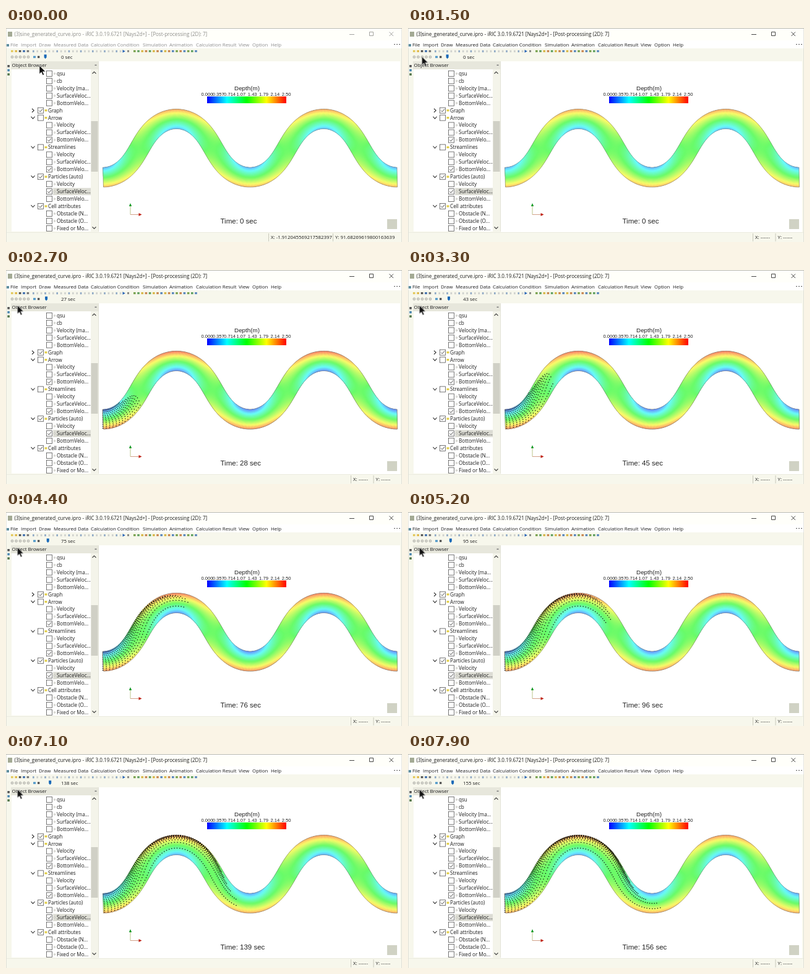
An HTML page with a canvas for the animation above (8 s loop, 640x347 px).

```html
<!DOCTYPE html>
<html lang="en">
<head>
<meta charset="utf-8">
<title>River flow post-processing</title>
<style>
  html, body { margin: 0; width: 640px; height: 347px; overflow: hidden; background: #fff; }
  #stage { position: relative; width: 640px; height: 347px; overflow: hidden; }
  svg, canvas { position: absolute; left: 0; top: 0; }
  text { font: 7.9px "Open Sans", "Noto Sans", sans-serif; fill: #1c1c1c; white-space: pre; }
  text.plot { font-family: "Liberation Sans", Arial, sans-serif; fill: #222; }
  #heading { animation: wake 8s step-end infinite; }
  #coords { animation: hide 8s step-end infinite; }
  #blank { animation: show 8s step-end infinite; }
  #cursor { animation: point 8s linear infinite; }
  #strong { animation: deepen 8s linear infinite; }
  @keyframes wake { 0% { opacity: .5 } 18.75% { opacity: 1 } }
  @keyframes hide { 0% { opacity: 1 } 18.75% { opacity: 0 } }
  @keyframes show { 0% { opacity: 0 } 18.75% { opacity: 1 } }
  @keyframes deepen {
    0%, 21% { opacity: 0 }
    27%, 42% { opacity: 1 }
    65% { opacity: .75 }
    78%, 100% { opacity: .3 }
  }
  @keyframes point {
    0%, 3% { transform: translate(54px, 61px); animation-timing-function: ease-in-out }
    16%, 30% { transform: translate(22.5px, 46.5px); animation-timing-function: ease-in-out }
    33.5%, 100% { transform: translate(18.5px, 57.5px) }
  }
</style>
</head>
<body>
<div id="stage">
  <svg id="ui" width="640" height="347" viewBox="0 0 640 347">
    <defs><linearGradient id="rainbow"></linearGradient></defs>
  </svg>
  <canvas id="mild" width="640" height="347"></canvas>
  <canvas id="strong" width="640" height="347"></canvas>
  <canvas id="dots" width="640" height="347"></canvas>
  <svg width="640" height="347" viewBox="0 0 640 347">
    <g id="cursor"><path d="M0 0V13.5L3.2 10.6L5.4 15.6L7.6 14.6L5.4 9.8H9.8Z" fill="#111" stroke="#fff" stroke-width=".5"/></g>
  </svg>
</div>
<script>
const ui = document.getElementById('ui');

function add(tag, attrs, parent = ui) {
  const el = document.createElementNS('http://www.w3.org/2000/svg', tag);
  for (const k in attrs) el.setAttribute(k, attrs[k]);
  return parent.appendChild(el);
}
const box = (x, y, width, height, fill, parent) => add('rect', { x, y, width, height, fill }, parent);
const line = (d, stroke, w = 1, parent) =>
  add('path', { d, stroke, fill: 'none', 'stroke-width': w }, parent);
function label(x, y, str, parent = ui, size = 7.9) {
  const el = add('text', { x, y, style: `font-size:${size}px` }, parent);
  el.textContent = str;
  return el;
}
function plot(x, y, str, size, anchor = 'start') {
  const el = label(x, y, str, ui, size);
  el.setAttribute('class', 'plot');
  el.setAttribute('text-anchor', anchor);
  return el;
}

const PANEL = '#f7f7ec', EDGE = '#d3d3c8';

function drawFrame() {
  box(0, 0, 640, 20, '#fffffa');
  box(0, 33, 640, 314, PANEL);
  box(150, 54, 487, 277, '#fff');
  line('M0 .5H640', '#b8b8b0');
  line('M.25 0V347M639.75 0V347', '#b8b8b0', .5);
  line('M0 331.5H640', '#e4e4d8', .6);

  box(3, 6, 7, 8, '#a3aa94');
  box(1, 26, 4, 4, '#5f8fa0');
  line('M627 26.5H629M631 26.5H633M635 26.5H637', '#555', 1);

  const head = add('g', { id: 'heading' });
  label(13.5, 13, '(3)sine_generated_curve.ipro - iRIC 3.0.19.6721 [Nays2d+] - [Post-processing (2D): 7]', head, 8.05);
  line('M555 10.5H563M587.5 6.5H593.5V12.5H587.5ZM619.5 6.5L626 13M626 6.5L619.5 13', '#333', .9, head);
  [[7, 'File'], [24, 'Import'], [53, 'Draw'], [77, 'Measured Data'], [137, 'Calculation Condition'],
   [221, 'Simulation'], [264, 'Animation'], [307, 'Calculation Result'], [376, 'View'],
   [398, 'Option'], [428, 'Help']].forEach(([x, s]) => label(x, 30, s, head));
}

function drawTools() {
  const icon = (x, y, fill, w = 3.6) => box(x, y, w, 3.2, fill);
  ['#e3c95c', '#e0b94c', '#555', '#3f6fae', '#777'].forEach((c, i) => icon(8 + i * 6.4, 36, c));
  for (let x = 43, i = 0; x < 184; x += 6.4, i++) icon(x, 36.2, i % 3 ? '#ced0cc' : '#8ba6c4', 2.6);
  add('path', { d: 'M188.5 35.3L192.8 37.7L188.5 40Z', fill: '#2763b5' });
  icon(196, 36, '#8a8a86', 3);
  const hues = ['#79a24e', '#d8b849', '#5987bd', '#60a060', '#c88650'];
  for (let i = 0; i < 17; i++) icon(206 + i * 6.2, 36, hues[(i * 3 + (i >> 2)) % 5]);
  for (let i = 0; i < 5; i++)
    add('circle', { cx: 10 + i * 6.5, cy: 47, r: 1.9, fill: '#dcdcd4', stroke: '#a4a49c', 'stroke-width': .8 });
  icon(44, 45.4, '#4d97c9', 4);
  icon(51, 45.4, '#4a4a4a', 3.4);
  ['#555', '#4b86b0', '#55774c'].forEach((c, i) => box(2.3, 60 + i * 6.7, 3.6, 3.6, c));
}

function drawTree() {
  box(8, 54, 141, 13, '#e7e7dc');
  label(9.5, 63.2, 'Object Browser');
  box(143.5, 59.5, 3, 1.5, '#777');
  box(9, 67, 128, 263, '#fff');
  box(137, 67, 12, 263, '#f4f4ea');
  box(137.5, 151, 11, 82, '#d0d0c6');
  line('M139.5 74L142.5 71L145.5 74M139.5 322.5L142.5 325.5L145.5 322.5', '#444', 1.1);
  line('M149.5 54V330', EDGE, .6);

  // * = checked, > = closed group, v = open group
  const rows = [' qsu', ' cb', ' Velocity (ma...', ' SurfaceVeloc...', ' BottomVelo...', '>*Graph',
    'vArrow', ' Velocity', ' SurfaceVeloc...', ' *BottomVelo...',
    'vStreamlines', ' Velocity', ' SurfaceVeloc...', ' *BottomVelo...',
    'v*Particles (auto)', ' Velocity', ' *SurfaceVeloc...', ' BottomVelo...',
    'v*Cell attributes', ' Obstacle (N...', ' Obstacle (O...', ' Fixed or Mo...'];
  rows.forEach((row, i) => {
    const y = 74 + i * 11.95, child = row[0] === ' ', on = row[1] === '*';
    const x = child ? 65.5 : 51.5;
    if (i === 16) box(76, y - 5.8, 61, 11.6, '#dcdcd4');
    if (!child) line(row[0] === 'v' ? `M40.5 ${y - 2}L43.5 ${y + 1.4}L46.5 ${y - 2}`
                                    : `M42 ${y - 3}L45.2 ${y}L42 ${y + 3}`, '#333', 1.1);
    add('rect', { x, y: y - 4.6, width: 9, height: 9, fill: '#fff', stroke: '#555', 'stroke-width': .8 });
    if (on) line(`M${x + 1.8} ${y}L${x + 3.8} ${y + 2}L${x + 7.5} ${y - 2.4}`, '#333', .9);
    if (child) add('circle', { cx: 78.5, cy: y, r: 1.2, fill: '#fff', stroke: '#a8a89c', 'stroke-width': .7 });
    else box(62.5, y - 1.7, 4, 3.2, '#e2cf4e');
    label(child ? 82 : 68, y + 2.8, row.slice(on ? 2 : 1), ui, 8.15);
  });
}

function drawStatus() {
  const pane = (id, x1, x2, a, b) => {
    const g = add('g', { id });
    line(`M${x1} 333V346M${x2} 333V346`, '#bdbdb0', .8, g);
    label(x1 + 3.5, 342, a, g);
    label(x2 + 3.5, 342, b, g);
  };
  pane('coords', 424.5, 528.5, 'X: -1.912045569217582397', 'Y: 91.68269619800163639');
  pane('blank', 557.5, 594, 'X: ------', 'Y: ------');
}

function drawPlotParts() {
  const ramp = document.getElementById('rainbow');
  for (let i = 0; i <= 8; i++)
    add('stop', { offset: i / 8, 'stop-color': `hsl(${240 - i * 30} 100% 50%)` }, ramp);
  plot(389.5, 100.7, 'Depth(m)', 9.8, 'middle');
  ['0.000', '0.357', '0.714', '1.07', '1.43', '1.79', '2.14', '2.50']
    .forEach((s, i) => plot(325 + i * 18.3, 109.8, s, 7.6, 'middle'));
  box(325, 111, 128, 11, 'url(#rainbow)');

  line('M201 302.5V288', '#9fae5a', .7);
  line('M201 302.5H216', '#c07a5a', .7);
  add('path', { d: 'M198.8 289L201 284L203.2 289Z', fill: '#139a28' });
  add('path', { d: 'M214.5 300L219.5 302.5L214.5 305Z', fill: '#c02418' });
  box(616, 310, 16, 16, '#d0d2c4');
}

drawFrame();
drawTools();
drawTree();
drawStatus();
drawPlotParts();
const knob = add('path', { d: 'M-2 43H2V47.5L0 50L-2 47.5Z', fill: '#1769b8' });
const barTime = label(89, 50, '0 sec');
const plotTime = plot(346.5, 316.5, 'Time: 0 sec', 11.5);

// Sine-generated channel: heading = BEND * sin(2 pi s / M)
const M = 320.4, BEND = 1.05, HALF = 16, DS = .25, LEN = 2 * M;
const phase = s => 2 * Math.PI * s / M;
const axis = [];
for (let s = 0, x = 156.5, y = 242; s <= LEN + DS; s += DS) {
  const a = BEND * Math.sin(phase(s + DS / 2));
  axis.push([x, y, BEND * Math.sin(phase(s))]);
  x += Math.cos(a) * DS;
  y -= Math.sin(a) * DS;
}
// n runs from -1 (right bank) to 1 (left bank)
function at(s, n) {
  const [x, y, a] = axis[Math.max(0, Math.min(axis.length - 1, Math.round(s / DS)))];
  return [x - Math.sin(a) * n * HALF, y - Math.cos(a) * n * HALF];
}

// swing: depth difference between mid-channel and the banks at a bend
function drawRiver(id, swing) {
  const g = document.getElementById(id).getContext('2d');
  const bank = new Path2D();
  for (let s = 0; s <= LEN; s++) bank.lineTo(...at(s, 1));
  for (let s = LEN; s >= 0; s--) bank.lineTo(...at(s, -1));
  bank.closePath();
  g.save();
  g.clip(bank);
  for (let s = 0; s <= LEN; s++)
    for (let n = -1; n <= 1; n += 1 / 16) {
      const depth = 1.27 - swing * n * Math.cos(phase(s));
      const [x, y] = at(s, n);
      g.fillStyle = `hsl(${240 * (1 - depth / 2.5)} 95% 70%)`;
      g.fillRect(x - 1.5, y - 1.5, 3, 3);
    }
  g.restore();
  g.strokeStyle = '#77776a';
  g.lineWidth = .6;
  g.stroke(bank);
}
drawRiver('mild', .93);
drawRiver('strong', 1.12);

// Particle tracks; surface drift pushes them towards the outer bank
const smooth = (a, b, v) => {
  const k = Math.max(0, Math.min(1, (v - a) / (b - a)));
  return k * k * (3 - 2 * k);
};
const ROWS = 11, AGE = .25, RELEASE = 2;
const tracks = Array.from({ length: ROWS }, (_, r) => {
  const n0 = Math.atanh(-.91 + r * 1.82 / (ROWS - 1)), pts = [];
  for (let age = 0, s = 0; age <= 160; age += AGE) {
    const p = phase(s);
    const n = Math.tanh(n0 + 1.2 * smooth(.2, 3.1, p) - .3 * smooth(4.5, 6.5, p));
    pts.push(at(s, n));
    // flow slackens beyond the first crest
    s += 2.4 * (1 - .15 * n - .3 * n * n) * (1 - .23 * smooth(3.2, 5, p)) * AGE;
  }
  return pts;
});

const ink = document.getElementById('dots').getContext('2d');
function drawDots(time) {
  ink.clearRect(0, 0, 640, 347);
  if (time <= 0) return;
  ink.fillStyle = '#0c0c0c';
  for (const pts of tracks)
    for (let age = time % RELEASE; age <= time; age += RELEASE) {
      const [x, y] = pts[Math.min(pts.length - 1, Math.round(age / AGE))];
      ink.fillRect(x - .65, y - .65, 1.3, 1.3);
    }
}

const KEYS = [0, 1700, 2200, 3300, 4400, 5200, 6200, 7900];
const PLOT = [0, 0, 14, 45, 76, 96, 120, 156];
const BAR = [0, 0, 14, 43, 75, 95, 119, 155];
function sample(values, ms) {
  let i = 1;
  while (i < KEYS.length - 1 && ms > KEYS[i]) i++;
  const k = (ms - KEYS[i - 1]) / (KEYS[i] - KEYS[i - 1]);
  return Math.round(values[i - 1] + (values[i] - values[i - 1]) * k);
}

let last = -1;
function tick() {
  const ms = Math.floor(performance.now() % 8000 / 100) * 100;
  if (ms !== last) {
    last = ms;
    const time = sample(PLOT, ms), shown = sample(BAR, ms);
    plotTime.textContent = `Time: ${time} sec`;
    barTime.textContent = `${shown} sec`;
    knob.setAttribute('transform', `translate(${63.6 + shown * .055} 0)`);
    drawDots(time);
  }
  requestAnimationFrame(tick);
}
tick();
</script>
</body>
</html>
```
